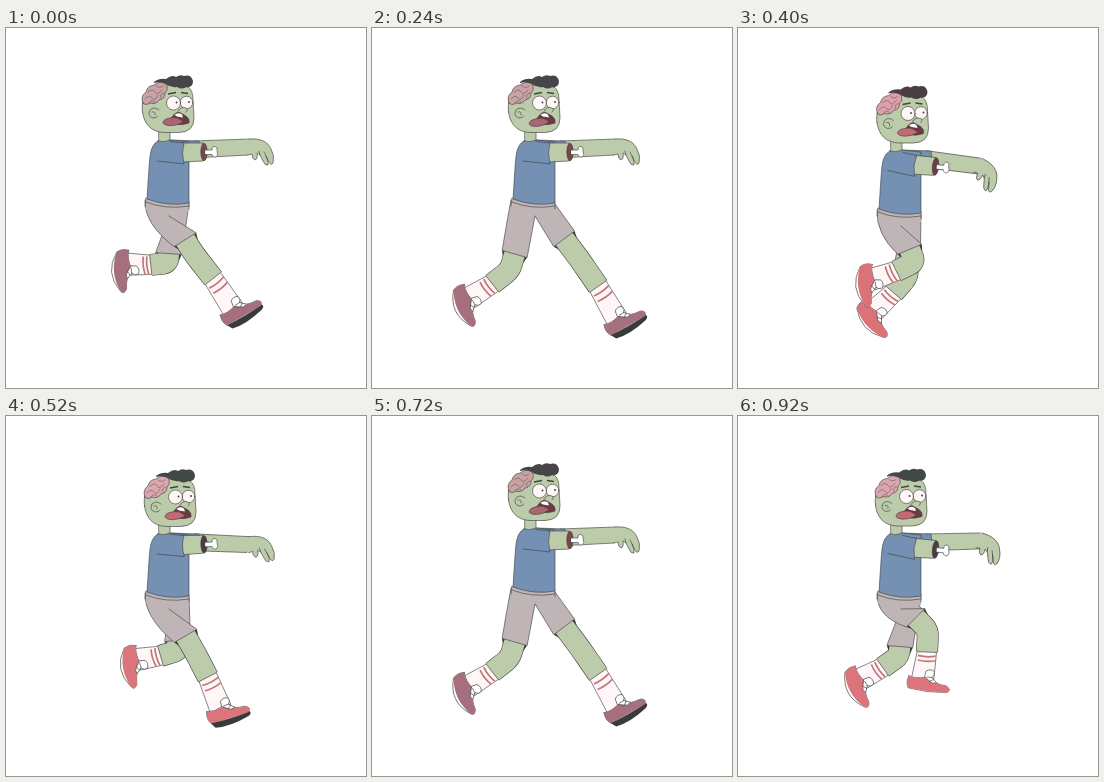
Write an HTML page that moves like this. It is 360 px wide and 360 px high and loops after 960 ms.

```html
<!DOCTYPE html>
<html lang="en">
<head>
<meta charset="utf-8">
<title>Zombie run</title>
<style>
html, body { margin: 0; width: 100%; height: 100%; overflow: hidden; background: #fff; }
svg { display: block; width: 100vw; height: 100vh; }
.o { stroke: #444; stroke-width: .65; stroke-linejoin: round; stroke-linecap: round; }
.n { fill: none; }
.skin { fill: #bccba9; }
.skinLine { stroke: #bccba9; }
.shirt { fill: #7491b4; }
.shorts { fill: #c0b5b6; }
.sock { fill: #fff7f7; }
.shoe { fill: var(--shoe); }
.brain { fill: var(--brain); }
.hair { fill: var(--hair); }
.dark { fill: #3a3a3d; }
.white { fill: #fff; }
.eye { fill: #fff7f7; }
.stripe { fill: none; stroke: #c4757b; stroke-width: 1.7; }
</style>
</head>
<body>
<svg viewBox="0 0 360 360" id="stage">
  <g id="farArm">
    <path class="o skin" d="M188 113L243 111L242 127L205 129L188 130Z"/>
    <g id="hand">
      <path class="skin" d="M240 111.5L246 112V125L240 126.5Z"/>
      <path class="o skin" d="M243 111C255 110 262 114 265 121Q269 128 267 135Q265 138 263 134L260 128Q263 134 262 137Q259 138 257 133L254 127L251 125Q252 131 249 132Q246 131 246 126L242 127"/>
      <path class="o n" d="M260 128L258 124M254 127L253 123"/>
    </g>
  </g>
  <g id="farLeg"></g>
  <g id="nearLeg"></g>
  <g id="body">
    <path class="shorts" d="M139.5 170H183V184Q165 187 140 182Z"/>
    <path class="o n" d="M140 170L139 178M183 174V181M140 174Q160 182 183 178"/>
    <path class="o shirt" d="M164 112L193 113L194 123L166 124Z"/>
    <path class="o skin" d="M153 100H164V116Q158 118 153 114Z"/>
    <path class="o shirt" d="M152 113Q158 115 164 112L183 114V175Q162 179 141 171L143 140C144 128 144 117 152 113Z"/>
    <g id="nearArm">
      <path class="o skin" d="M176 115L197 115Q200 124 197 133L176 134Z"/>
      <ellipse class="o" id="stump" cx="198" cy="124" rx="3.2" ry="8.8"/>
      <path class="o white" d="M199 122L206 122Q206 118 209 118.500Q212 119 211 123Q213 127 210 129Q207 130 206 126.500L199 126.500Z"/>
      <path class="shirt" d="M152 114L178 115Q175 125 178 135L152 133Z"/>
      <path class="o n" d="M164 113.500L178 115Q175 125 178 136L151 133"/>
    </g>
  </g>
  <g id="head">
    <path class="o skin" d="M136.500 84C134 66 146 55 162 57L182 59Q187 62 187 72L188 90Q188 104 173 104.500H158C145 104 138 96 136.500 84Z"/>
    <path class="o brain" d="M137 75Q134 68 140 64Q141 58 148 57Q154 52 160 56Q163 61 159 65Q159 71 153 72Q150 77 144 75Q140 78 137 75Z"/>
    <path class="o n" stroke-opacity=".7" d="M139 71Q143 66 146 70T152 67M142 64Q147 60 149 64T156 62M150 58Q154 61 157 58M143 75Q145 71 149 74M155 70Q153 66 158 65"/>
    <path class="hair" d="M148 54Q153 50 160 51Q166 46 170 49Q174 46 178 48Q185 46 187 53Q187 60 180 59Q176 62 171 59Q165 60 160 56Q154 53 148 55Z"/>
    <path class="o n" d="M153 82Q148 78 144 82Q141 88 147 90Q151 90 152 88M146 84Q150 83 149 87"/>
    <circle class="o eye" cx="180.500" cy="74.500" r="6.300"/>
    <circle class="o eye" cx="167.500" cy="75" r="7"/>
    <circle class="dark" cx="170.500" cy="74.500" r=".9"/>
    <circle class="dark" cx="183" cy="74" r=".9"/>
    <path class="n" stroke="#444" stroke-width="1.300" d="M162 66L170 64.500M175 64.500L182 65.500"/>
    <path class="o skin" d="M172 83Q175 78 180 80Q183 82 180 84"/>
    <path class="o" fill="#6d3a43" d="M163 94Q168 84 173 84L180 88Q184 91 183 95Q176 98 168 96Z"/>
    <path class="white" d="M168.500 87Q172 84 176 86.500L177 89.500L171 88.500Z"/>
    <path class="o" id="tongue" d="M177 94Q172 88 164 90Q157 91 157 95Q160 99 170 97Z"/>
  </g>
</svg>
<script>
const $ = id => document.getElementById(id);
const STEP = 40, CYCLE = 480, LOOP = 960;

// time, knee x y, ankle x y, foot angle
const near = [
  [0, 188, 226, 228, 277, -33], [80, 187, 243, 194, 300, 0],
  [120, 174, 248, 169, 308, 0], [160, 158, 243, 145, 303, 2],
  [240, 138, 242, 101, 271, 62], [320, 141, 243, 105, 231, 120],
  [400, 177, 234, 138, 253, 80], [440, 190, 214, 188, 260, 4]
];
const far = [
  [0, 162, 235, 126, 239, 82], [80, 186, 232, 150, 256, 62],
  [160, 214, 210, 211, 256, 3], [240, 208, 232, 246, 287, -32],
  [320, 194, 243, 203, 300, 1], [360, 184, 249, 175, 307, 10],
  [400, 170, 248, 140, 283, 45], [440, 161, 240, 127, 264, 58]
];

// values for the six steps of one stride
const stride = {
  bob: [0, 5, 10, 13, 10, 5],
  headX: [0, 2, 4, 4, 2.5, 1],
  headY: [0, 1, 1.5, 1, .5, .5],
  arm: [0, 5, 11, 13, 10, 1],
  hand: [0, -3, 3, 18, 30, 20],
  stub: [0, -1, -2, 2, 6, 6]
};
const tones = [
  { shoe: '#a56f7d', brain: '#c9a2a5', hair: '#464648', stump: '#7a464e', tongue: '#a96672' },
  { shoe: '#db747b', brain: '#dba6ae', hair: '#424846', stump: '#483d41', tongue: '#c46873' },
  { shoe: '#db7278', brain: '#dba0a9', hair: '#493f42', stump: '#763a42', tongue: '#c46873' }
];
const toneOf = [0, 1, 1, 2, 2, 1];

// smooth closed curve through unevenly timed keys
function pose(keys, t) {
  const n = keys.length;
  const at = i => {
    const turn = Math.floor(i / n), k = keys[i - turn * n];
    return [k[0] + turn * CYCLE, ...k.slice(1)];
  };
  let i = n - 1;
  while (keys[i][0] > t) i--;
  const [a, b, c, d] = [at(i - 1), at(i), at(i + 1), at(i + 2)];
  const h = c[0] - b[0], u = (t - b[0]) / h;
  return b.slice(1).map((v, j) => {
    const w = c[j + 1];
    const m0 = (w - a[j + 1]) / (c[0] - a[0]) * h;
    const m1 = (d[j + 1] - v) / (d[0] - b[0]) * h;
    return v + u * (m0 + u * (3 * (w - v) - 2 * m0 - m1 + u * (2 * (v - w) + m0 + m1)));
  });
}

const P = (...p) => p.map(v => v.toFixed(2)).join(' ');
const mix = (p, q, u) => [p[0] + (q[0] - p[0]) * u, p[1] + (q[1] - p[1]) * u];
const unit = (p, q) => {
  const x = q[0] - p[0], y = q[1] - p[1], l = Math.hypot(x, y);
  return [x / l, y / l];
};
const off = (p, d, s) => [p[0] + d[0] * s, p[1] + d[1] * s];
const set = (el, attrs) => { for (const k in attrs) el.setAttribute(k, attrs[k]); };

function makeLeg(root) {
  root.innerHTML = `
    <path class="dark"/>
    <path class="n" stroke="#444" stroke-width="22" stroke-linejoin="round"/>
    <path class="n skinLine" stroke-width="20.800" stroke-linejoin="round"/>
    <path class="o sock"/>
    <path class="stripe"/>
    <g>
      <path class="dark" d="M-17 13Q3 16 23 14Q26 17 21 19Q0 23 -14 19Z"/>
      <path class="o white"/>
      <path class="shoe"/>
      <path class="o white" d="M0 -5Q4 -8 8 -5Q9 -1 6 1L11 6Q7 8 4 5L-1 1Z"/>
      <path class="o n" d="M1 1L6 1M4 5L8 3"/>
    </g>
    <path class="shorts"/>
    <path class="o n"/>`;
  const [gap, edge, flesh, sock, stripe, shoe, fill, line] = root.children;
  const [tread, sole, upper] = shoe.children;
  return { gap, edge, flesh, sock, stripe, shoe, tread, sole, upper, fill, line };
}

// the underside rounds out by b as the heel lifts
const shoeShape = b => `M-17 1Q-20 7 -17 13Q2 ${P(15 + b * 2)} 22 15Q27 12 21 8.500Q15 8 10 6Q3 5 0 1Q-9 4 -17 1Z`;

function drawLeg(leg, keys, t, bob, isNear) {
  const [kx, ky, ax, ay, turn] = pose(keys, t);
  const hip = [isNear ? 157 : 166, 176 + bob], knee = [kx, ky], ankle = [ax, ay];
  const d = unit(hip, knee), n = [d[1], -d[0]];
  const len = Math.hypot(kx - hip[0], ky - hip[1]);
  // shorts ride up on a thigh that swings forward
  const hem = off(hip, d, Math.min(52, len * .84) - 14 * Math.max(0, d[0]));
  const left = off(hem, n, -13), right = off(hem, n, 13);

  set(leg.gap, { d: `M${P(...left)}L${P(...right)}L${P(...off(off(hem, n, 11), d, 6))}L${P(...off(off(hem, n, -10), d, 7))}Z` });

  const top = mix(knee, ankle, .48);
  const limb = `M${P(...off(hem, d, -5))}L${P(...off(knee, d, -6))}Q${P(...knee)} ${P(...mix(knee, ankle, .14))}L${P(...top)}`;
  set(leg.edge, { d: limb });
  set(leg.flesh, { d: limb });

  const s = unit(knee, ankle), m = [s[1], -s[0]];
  const a = turn * Math.PI / 180, f = [Math.cos(a), Math.sin(a)];
  const heel = off(off(ankle, f, -14), s, 3), front = off(off(ankle, f, 8), s, 2);
  set(leg.sock, { d: `M${P(...off(top, m, -9.5))}L${P(...off(top, m, 9.5))}L${P(...front)}L${P(...heel)}Z` });
  const band = u => {
    const c = mix(knee, ankle, u);
    return `M${P(...off(c, m, -9))}Q${P(...off(c, s, 2))} ${P(...off(c, m, 9))}`;
  };
  set(leg.stripe, { d: band(.56) + band(.66) });

  const lift = Math.min(1, Math.max(0, turn / 50));
  set(leg.shoe, { transform: `translate(${P(ax, ay)}) rotate(${turn.toFixed(2)})` });
  set(leg.tread, { opacity: turn < -12 ? 1 : 0 });
  set(leg.upper, { d: shoeShape(lift * 4) });
  set(leg.sole, { d: shoeShape(.5 + lift * 6) });

  const wl = [139, 172 + bob], wr = [183, 176 + bob], fork = [163, 188 + bob];
  let side;
  if (isNear) {
    const bend = [138 + Math.min(left[0] - 139, 0) * .4, 196 + bob];
    side = `M${P(...wl)}Q${P(...bend)} ${P(...left)}L${P(...right)}L${P(...fork)}`;
    set(leg.fill, { d: `${side}L${P(...wr)}Z` });
  } else {
    side = `M${P(...fork)}L${P(...left)}L${P(...right)}L${P(...wr)}`;
    set(leg.fill, { d: `${side}L${P(...wl)}Z` });
  }
  set(leg.line, { d: side });
}

const nearLeg = makeLeg($('nearLeg')), farLeg = makeLeg($('farLeg'));
const bump = (t, c) => Math.max(0, 1 - Math.abs(t - c) / 100);

function draw(time) {
  const t = Math.floor(time % LOOP / STEP) * STEP;
  const k = t / STEP % 6;
  const s = name => stride[name][k];
  const bob = s('bob'), tone = tones[toneOf[k]];

  for (const name of ['shoe', 'brain', 'hair'])
    $('stage').style.setProperty('--' + name, tone[name]);
  set($('stump'), { fill: tone.stump });

  drawLeg(farLeg, far, t % CYCLE, bob, false);
  drawLeg(nearLeg, near, t % CYCLE, bob, true);
  set($('body'), { transform: `translate(0 ${bob})` });
  set($('nearArm'), { transform: `rotate(${s('stub')} 155 122)` });
  set($('farArm'), { transform: `translate(0 ${bob}) rotate(${s('arm')} 190 118)` });
  set($('hand'), { transform: `rotate(${s('hand') - s('arm')} 243 115)` });
  set($('head'), { transform: `translate(${s('headX')} ${bob + s('headY')})` });
  const hang = bump(t, 160) + bump(t, 800);
  set($('tongue'), { fill: tone.tongue, transform: `rotate(${-20 * hang} 176 93)` });
}

const start = performance.now();
function tick() {
  draw(performance.now() - start);
  requestAnimationFrame(tick);
}
tick();
</script>
</body>
</html>
```
